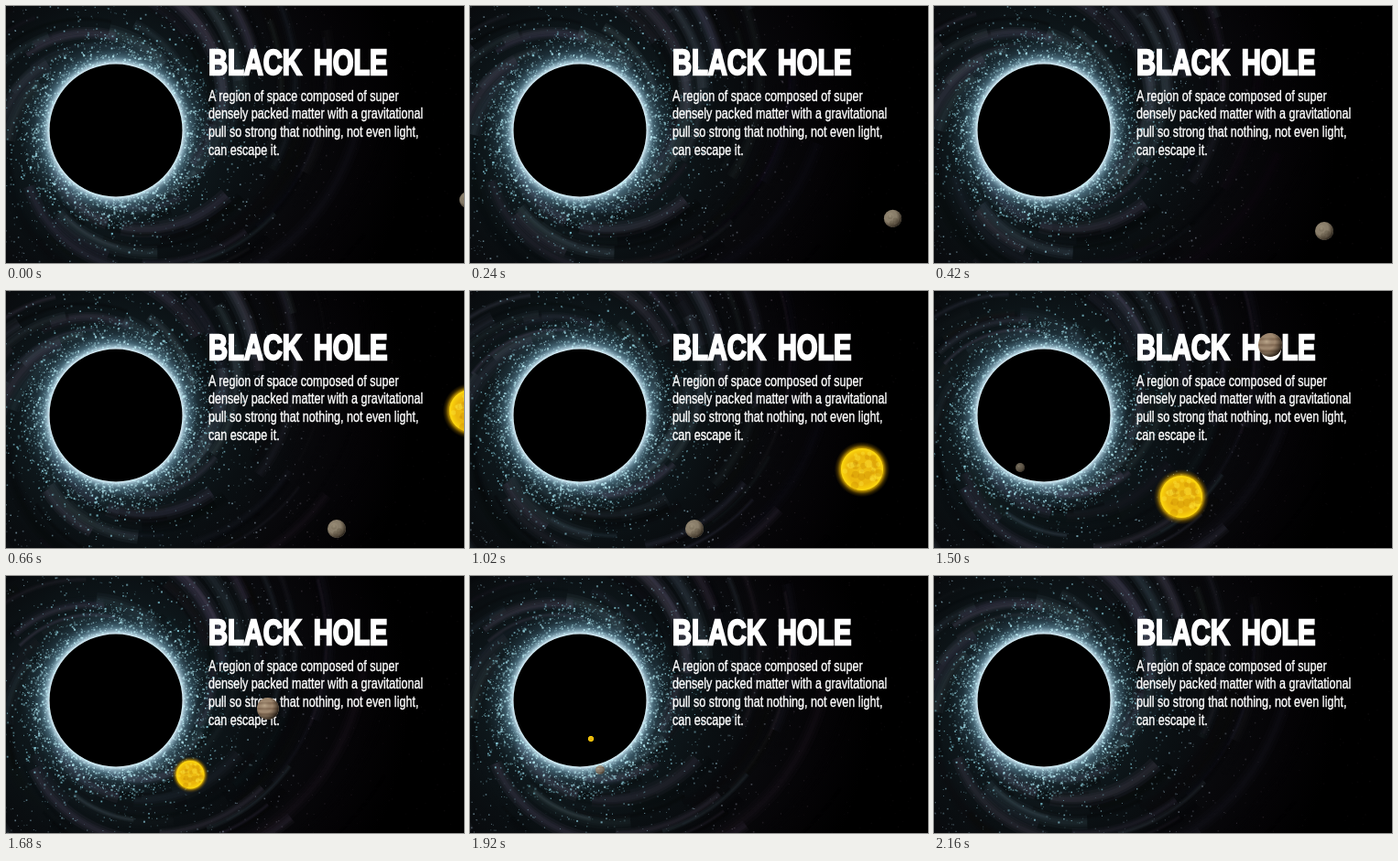
Recreate the animation shown at these times as an HTML page with a canvas. Size 500 by 281 pixels, loop 2.22 s.

```html
<!DOCTYPE html>
<html lang="en">
<head>
<meta charset="utf-8">
<title>Black hole</title>
<style>
  html, body { margin: 0; width: 100%; height: 100%; overflow: hidden; background: #000; }
  canvas, svg { position: absolute; left: 0; top: 0; }
  text { font-family: "Liberation Sans", Arial, sans-serif; fill: #fff; stroke: #fff; }
  .title { font-size: 39px; font-weight: 700; stroke-width: 2.3px; word-spacing: 7px; letter-spacing: -.2px; }
  .body { font-size: 16.8px; stroke-width: .4px; }
</style>
</head>
<body>
<canvas id="space" width="500" height="281"></canvas>
<svg width="500" height="281">
  <!-- condensed face -->
  <g transform="translate(221 0) scale(.75 1)">
    <text class="title" x="0" y="75">BLACK HOLE</text>
    <text class="body">
      <tspan x="0" y="104">A region of space composed of super</tspan>
      <tspan x="0" y="123.5">densely packed matter with a gravitational</tspan>
      <tspan x="0" y="143.3">pull so strong that nothing, not even light,</tspan>
      <tspan x="0" y="163">can escape it.</tspan>
    </text>
  </g>
</svg>
<canvas id="bodies" width="500" height="281"></canvas>
<script>
const LOOP = 2220, STEP = 60, W = 500, H = 281, TAU = Math.PI * 2;
const CX = 120, CY = 136, R = 72.5;
const space = document.getElementById('space').getContext('2d');
const front = document.getElementById('bodies').getContext('2d');

let seed = 7;
const rand = () => (seed = seed * 16807 % 2147483647) / 2147483647;
const many = (n, make) => Array.from({ length: n }, make);

// Dust: a dense rim around the hole and a wide, thinning disc
const stars = many(5200, () => {
  const d = rand() < .27 ? 36 * rand() ** 1.2 : 330 * rand() ** 1.45;
  const far = Math.min(1, d / 200), rim = Math.max(0, 1 - d / 40);
  return {
    r: R - 1 + d, angle: rand() * TAU, phase: rand(),
    size: .8 + rand() ** 2 * (1.5 - .6 * far),
    alpha: (.25 + .75 * rand()) * (1 - .55 * far),
    color: `rgb(${110 + 70 * far + 90 * rim},${208 - 60 * far + 32 * rim},${222 - 55 * far + 25 * rim})`
  };
});

const streaks = many(130, (_, i) => ({
  r: 105 + 215 * rand(), angle: rand() * TAU, phase: rand(),
  width: 4 + 14 * rand(), span: .5 + .7 * rand(),
  color: i % 2 ? '0,0,0' : rand() < .5 ? '92,84,108' : '80,98,108'
}));

// Each key: time, x, y, radius
const moonPath = [[-180, 534, 192, 9], [0, 504, 212, 9], [420, 426, 246, 10], [660, 361, 260, 10],
  [1020, 245, 260, 10], [1260, 162, 240, 8], [1500, 94, 193, 5], [1620, 98, 163, 2], [1680, 110, 150, 0]];
const sunPath = [[480, 550, 90, 23], [660, 507, 131, 23], [1020, 428, 195, 23], [1500, 270, 225, 23],
  [1740, 180, 211, 12], [1920, 132, 178, 2.8], [2040, 122, 150, 0]];
const planetPath = [[1260, 425, -40, 13], [1380, 405, -6, 13], [1500, 367, 59, 13], [1740, 255, 169, 11],
  [1920, 142, 212, 5], [2040, 102, 186, 2], [2100, 104, 165, 0]];

// Smooth curve through timed keys
function along(keys, t) {
  const i = keys.findIndex((k, n) => n && t < k[0]) - 1;
  if (i < 0 || t < keys[0][0]) return null;
  const a = keys[i], b = keys[i + 1], p = keys[i - 1] || a, q = keys[i + 2] || b;
  const dt = b[0] - a[0], u = (t - a[0]) / dt;
  return [1, 2, 3].map(c => {
    const va = (b[c] - p[c]) / (b[0] - p[0]) * dt;
    const vb = (q[c] - a[c]) / (q[0] - a[0]) * dt;
    const d = b[c] - a[c];
    return a[c] + u * (va + u * (3 * d - 2 * va - vb + u * (va + vb - 2 * d)));
  });
}

function radial(ctx, x, y, r0, r1, stops) {
  const g = ctx.createRadialGradient(x, y, r0, x, y, r1);
  stops.forEach(([at, color]) => g.addColorStop(at, color));
  return g;
}

function disc(ctx, x, y, r, fill) {
  ctx.fillStyle = fill;
  ctx.beginPath();
  ctx.arc(x, y, r, 0, TAU);
  ctx.fill();
}

const rightFade = x => 1 - .85 * Math.min(1, Math.max(0, (x - 270) / 120));

function drawStreak(s, k) {
  const p = (k + s.phase) % 1, fade = Math.sin(Math.PI * p);
  const mid = s.angle + .5 * p + s.span / 2;
  const alpha = .17 * fade * (1 - s.r / 480) * rightFade(CX + s.r * .85 * Math.cos(mid));
  space.strokeStyle = `rgba(${s.color},${alpha})`;
  for (const w of [1, .6, .3]) {
    space.lineWidth = s.width * w;
    space.beginPath();
    for (let n = 0; n <= 16; n++) {
      const turn = s.span * n / 16 + .5 * p;
      const r = s.r * Math.exp(-.28 * turn);
      space.lineTo(CX + r * Math.cos(s.angle + turn), CY + r * Math.sin(s.angle + turn));
    }
    space.stroke();
  }
}

function drawStar(s, k) {
  const p = (k + s.phase) % 1;
  const a = s.angle + .5 * p, r = R - 1 + (s.r - R + 1) * (1 - .12 * p);
  const x = CX + r * Math.cos(a), y = CY + r * Math.sin(a);
  if (x < -2 || x > W || y < -2 || y > H) return;
  space.globalAlpha = s.alpha * rightFade(x) * Math.min(1, 5 * Math.sin(Math.PI * p));
  space.fillStyle = s.color;
  space.fillRect(x, y, s.size, s.size);
}

function drawSpace(k) {
  space.globalAlpha = 1;
  space.fillStyle = radial(space, CX, CY, R, 320, [
    [0, '#1c2c34'], [.12, '#0e171b'], [.3, '#0a0f12'], [.55, '#08080b'], [.8, '#040305'], [1, '#000']]);
  space.fillRect(0, 0, W, H);
  streaks.forEach(s => drawStreak(s, k));
  space.globalAlpha = 1;
  disc(space, CX, CY, 106, radial(space, CX, CY, R, 106, [
    [0, 'rgba(228,246,255,1)'], [.1, 'rgba(180,218,236,.74)'], [.25, 'rgba(125,180,205,.42)'],
    [.5, 'rgba(80,130,155,.17)'], [1, 'rgba(50,90,110,0)']]));
  stars.forEach(s => drawStar(s, k));
  space.globalAlpha = 1;
  disc(space, CX, CY, R, '#000');
}

function drawRock(pos, bands) {
  if (!pos || pos[2] < .3) return;
  const [x, y, r] = pos;
  front.save();
  front.globalAlpha = Math.min(1, .4 + r / 16);
  disc(front, x, y, r, bands ? '#a58d74' : '#8f8470');
  front.clip();
  if (bands) {
    front.fillStyle = 'rgba(104,76,56,.4)';
    for (const o of [-.6, -.1, .4]) front.fillRect(x - r, y + o * r, 2 * r, r * .22);
  } else {
    for (const [dx, dy] of [[-.3, -.2], [.3, .2], [-.1, .5]])
      disc(front, x + dx * r, y + dy * r, r * .28, 'rgba(82,72,56,.35)');
  }
  disc(front, x, y, r, radial(front, x - r * .3, y - r * .3, 0, r * 1.4, [
    [0, 'rgba(230,215,185,.35)'], [.5, 'rgba(60,45,30,.05)'], [1, 'rgba(15,10,5,.85)']]));
  front.restore();
}

const spots = many(34, () => ({ a: rand() * TAU, d: Math.sqrt(rand()) * .85, r: .07 + .13 * rand(), hot: rand() < .5 }));

function drawSun(pos) {
  if (!pos || pos[2] < .3) return;
  const [x, y, r] = pos;
  disc(front, x, y, r * 1.32, radial(front, x, y, r * .9, r * 1.32, [
    [0, 'rgba(255,212,0,1)'], [.35, 'rgba(235,180,0,.7)'], [.65, 'rgba(180,130,0,.3)'], [1, 'rgba(120,80,0,0)']]));
  disc(front, x, y, r, radial(front, x, y, 0, r, [
    [0, '#f0c014'], [.7, '#ebb60c'], [.9, '#f7cc0c'], [1, '#ffdc14']]));
  for (const s of spots)
    disc(front, x + Math.cos(s.a) * s.d * r, y + Math.sin(s.a) * s.d * r, s.r * r,
      s.hot ? 'rgba(255,232,60,.38)' : 'rgba(196,128,0,.3)');
}

let last = -1;
function frame() {
  const t = Math.floor(performance.now() / STEP) * STEP % LOOP;
  if (t !== last) {
    last = t;
    drawSpace(t / LOOP);
    front.clearRect(0, 0, W, H);
    drawRock(along(moonPath, t));
    drawRock(along(planetPath, t), true);
    drawSun(along(sunPath, t));
  }
  requestAnimationFrame(frame);
}
frame();
</script>
</body>
</html>
```
